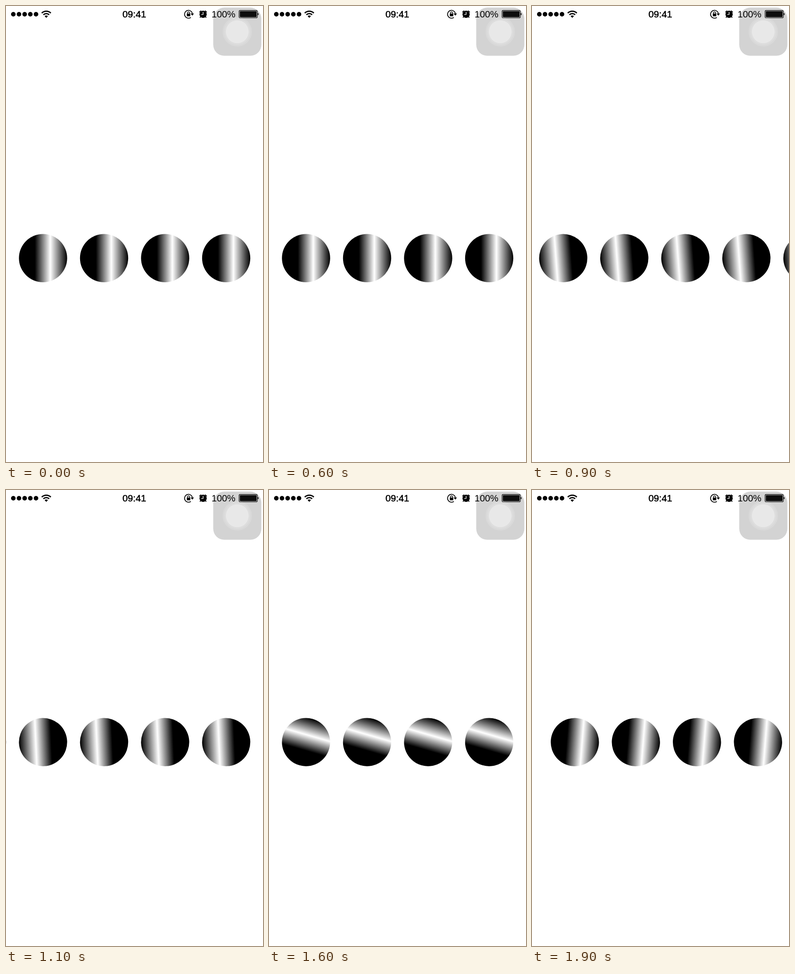
Recreate the animation shown at these times as an HTML page. Size 562 by 997 pixels, loop 2000 ms.

```html
<!DOCTYPE html>
<html lang="en">
<head>
<meta charset="utf-8">
<title>Rolling balls</title>
<style>
  html, body { margin: 0; width: 100%; height: 100%; overflow: hidden; background: #fff; }
  svg { display: block; width: 562px; height: 997px; }
  text { font-family: "Liberation Sans", Arial, sans-serif; }
</style>
</head>
<body>
<svg viewBox="0 0 562 997">
  <defs>
    <linearGradient id="metal">
      <stop offset=".33" stop-color="#000"/>
      <stop offset=".65" stop-color="#fff"/>
      <stop offset="1" stop-color="#000"/>
    </linearGradient>
  </defs>

  <g id="balls"></g>

  <!-- signal and wifi -->
  <path d="M16 18h50" stroke="#000" stroke-width="10" stroke-linecap="round" stroke-dasharray="0 12.4"/>
  <g fill="none" stroke="#000" stroke-width="2.8">
    <path d="M78.2 15.4a14 14 0 0 1 19.8 0"/>
    <path d="M81.8 19.2a9 9 0 0 1 12.6 0"/>
  </g>
  <path d="M88.1 26l-3.6-3.9a5.2 5.2 0 0 1 7.2 0z"/>

  <text x="254.8" y="25.2" font-size="20.6" stroke="#000" stroke-width=".55">09:41</text>

  <!-- rotation lock -->
  <path d="M404.2 25a8.6 8.6 0 1 1 3.4-8" fill="none" stroke="#000" stroke-width="1.7"/>
  <path d="M403.6 16.5h7.6l-3.8 4.6z"/>
  <rect x="395.4" y="16.6" width="7.6" height="5.8" rx=".6"/>
  <path d="M396.9 17v-1.8a2.3 2.3 0 0 1 4.6 0v1.8" fill="none" stroke="#000" stroke-width="1.4"/>

  <!-- alarm -->
  <circle cx="431" cy="18.2" r="7.9"/>
  <path d="M423 13.8a10 10 0 0 1 3.8-3.6M435.2 10.2a10 10 0 0 1 3.8 3.6M425.8 23.4l-1.8 2M436.2 23.4l1.8 2" fill="none" stroke="#000" stroke-width="1.8"/>
  <path d="M431 13v5.6h-4" fill="none" stroke="#fff" stroke-width="1.4"/>

  <text x="449.6" y="25.2" font-size="20.4">100%</text>

  <!-- battery -->
  <rect x="509.6" y="9.6" width="40" height="16.4" rx="2.6" fill="none" stroke="#000" stroke-width="1.1"/>
  <rect x="511.2" y="11.2" width="36.8" height="13.2" rx="1.4" fill="#111"/>
  <path d="M550.5 15a3 3 0 0 1 0 5.6z"/>

  <!-- floating button -->
  <rect x="453.2" y="3.6" width="105.2" height="105.2" rx="24" fill-opacity=".172"/>
  <g fill="#fff">
    <circle cx="505.7" cy="56.3" r="32.2" fill-opacity=".14"/>
    <circle cx="505.7" cy="56.3" r="28.6" fill-opacity=".1"/>
    <circle cx="505.7" cy="56.3" r="25" fill-opacity=".32"/>
  </g>
</svg>
<script>
const LOOP = 2000, STEP = 100;
const FIRST_X = 81, CENTER_Y = 551.2, RADIUS = 52.7, PITCH = 133.5;
const PAGE = 4 * PITCH;

const balls = Array.from({ length: 9 }, () => {
  const ball = document.createElementNS("http://www.w3.org/2000/svg", "circle");
  ball.setAttribute("r", RADIUS);
  ball.setAttribute("fill", "url(#metal)");
  return document.getElementById("balls").appendChild(ball);
});

const progress = (t, start, duration) => Math.min(1, Math.max(0, (t - start) / duration));
const easeInOut = u => (1 - Math.cos(Math.PI * u)) / 2;
// Smoothstep with a slight overshoot before settling
const overshoot = u => u * u * (3 - 2 * u) + (u * (1 - u)) ** 2 * (2.81 + 2.7 * u);

function draw(t) {
  // Roll one page left, spin once in place, roll back
  const roll = overshoot(progress(t, 642, 312)) - overshoot(progress(t, 1647, 312));
  const spin = easeInOut(progress(t, 1054, 860));
  const angle = -180 * roll - 360 * spin;
  balls.forEach((ball, i) => {
    const x = FIRST_X + i * PITCH - PAGE * roll;
    ball.setAttribute("transform", `translate(${x} ${CENTER_Y}) rotate(${angle})`);
  });
}

const origin = performance.now();
function tick() {
  const t = Math.max(0, performance.now() - origin) % LOOP;
  draw(Math.floor(t / STEP) * STEP);
  requestAnimationFrame(tick);
}
tick();
</script>
</body>
</html>
```
